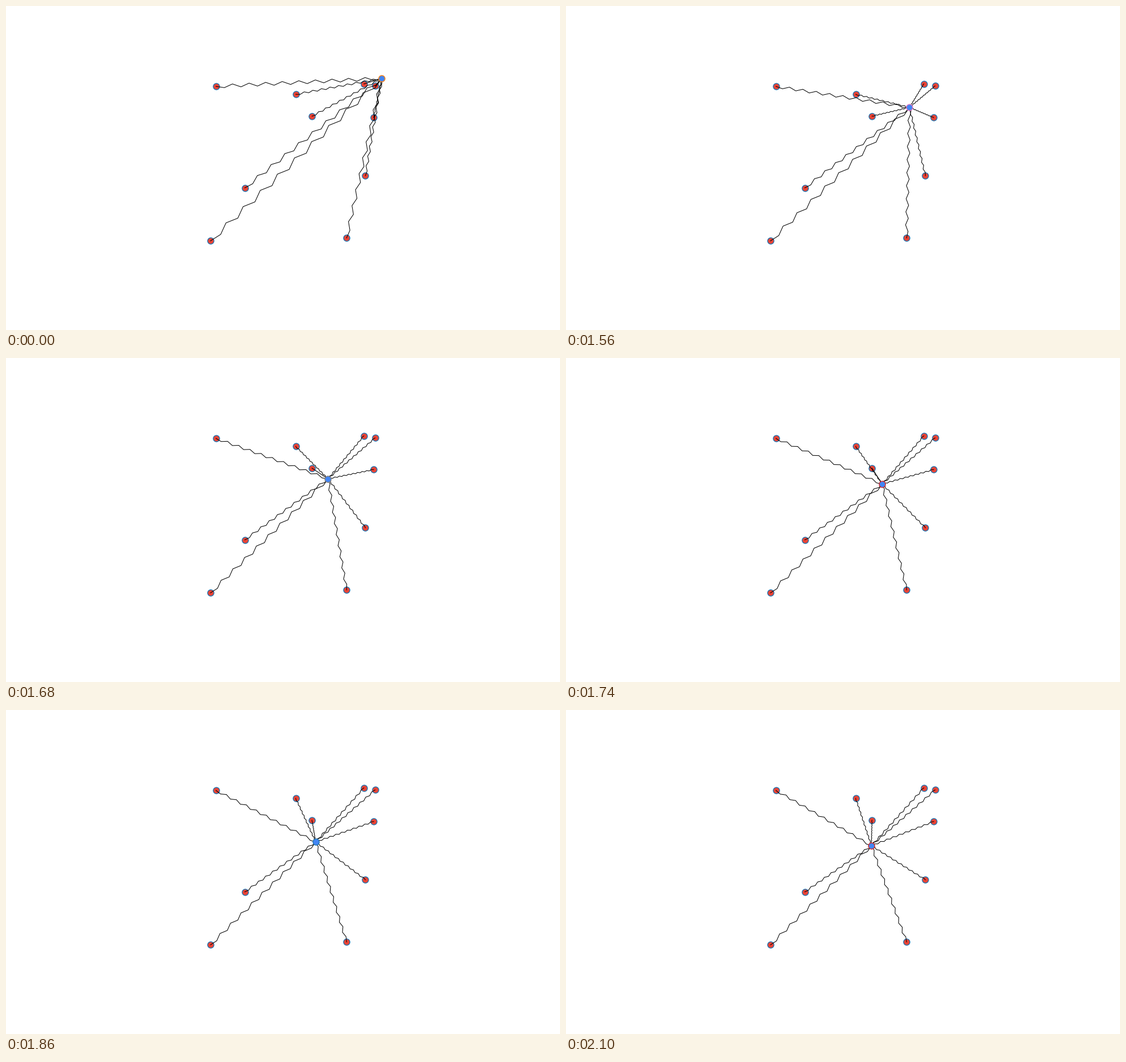
Write a matplotlib script that moves like this. It is 978x573 px and loops after 2200 ms.

```python
import numpy as np
import matplotlib.pyplot as plt
from matplotlib.animation import FuncAnimation

W, H, DPI = 978, 573, 100
TICK, LOOP = 10, 2200           # ms
HOLD, STEP, LAST = 1500, 30, 21  # rest time, ms per move, number of moves
DECAY = np.exp(-0.2)
COILS, AMP = 20, 0.01

START = np.array([663.3, 128.0])
ANCHORS = np.array([
    (370.7, 142.2), (511.5, 156.2), (540.2, 194.8), (421.5, 321.6),
    (361.0, 415.3), (601.2, 410.2), (634.4, 300.2), (649.0, 197.4),
    (651.6, 141.4), (631.7, 137.8),
])
REST = ANCHORS.mean(axis=0)
# colour-cycle index of the moving node's rim after each move
RIMS = [1, 8, 5, 6, 9, 4, 1, 7, 2, 3, 6, 8, 5, 0, 9, 1, 7, 2, 4, 6, 8, 3]


def spring(a, b):
    """Zigzag from a to b whose width is proportional to its length."""
    d = b - a
    i = np.arange(COILS + 1)
    side = np.where(i % 2, AMP, -AMP)
    side[[0, -1]] = 0
    return a + np.outer(i / COILS, d) + np.outer(side, (-d[1], d[0]))


# the small margin keeps the pixel size from being rounded down
fig = plt.figure(figsize=((W + 0.01) / DPI, (H + 0.01) / DPI), dpi=DPI,
                 facecolor="white")
ax = fig.add_axes([0, 0, 1, 1])
ax.set_xlim(0, W)
ax.set_ylim(H, 0)
ax.axis("off")

dot = dict(marker="o", ls="none", ms=8, mew=1)
ax.plot(*ANCHORS.T, mfc="#ea4335", mec="C0", zorder=2, **dot)
springs = [ax.plot([], [], color="black", lw=0.75, zorder=3)[0] for _ in ANCHORS]
node, = ax.plot([], [], mfc="#4285f4", zorder=4, **dot)


def update(frame):
    t = frame * TICK
    move = 0 if t < HOLD else min(LAST, (t - HOLD) // STEP + 1)
    pos = REST + (START - REST) * DECAY ** move
    for line, anchor in zip(springs, ANCHORS):
        line.set_data(*spring(anchor, pos).T)
    node.set_data([pos[0]], [pos[1]])
    node.set_markeredgecolor(f"C{RIMS[move]}")
    return [*springs, node]


anim = FuncAnimation(fig, update, frames=LOOP // TICK, interval=TICK,
                     repeat=True, repeat_delay=0)
plt.show()
```
